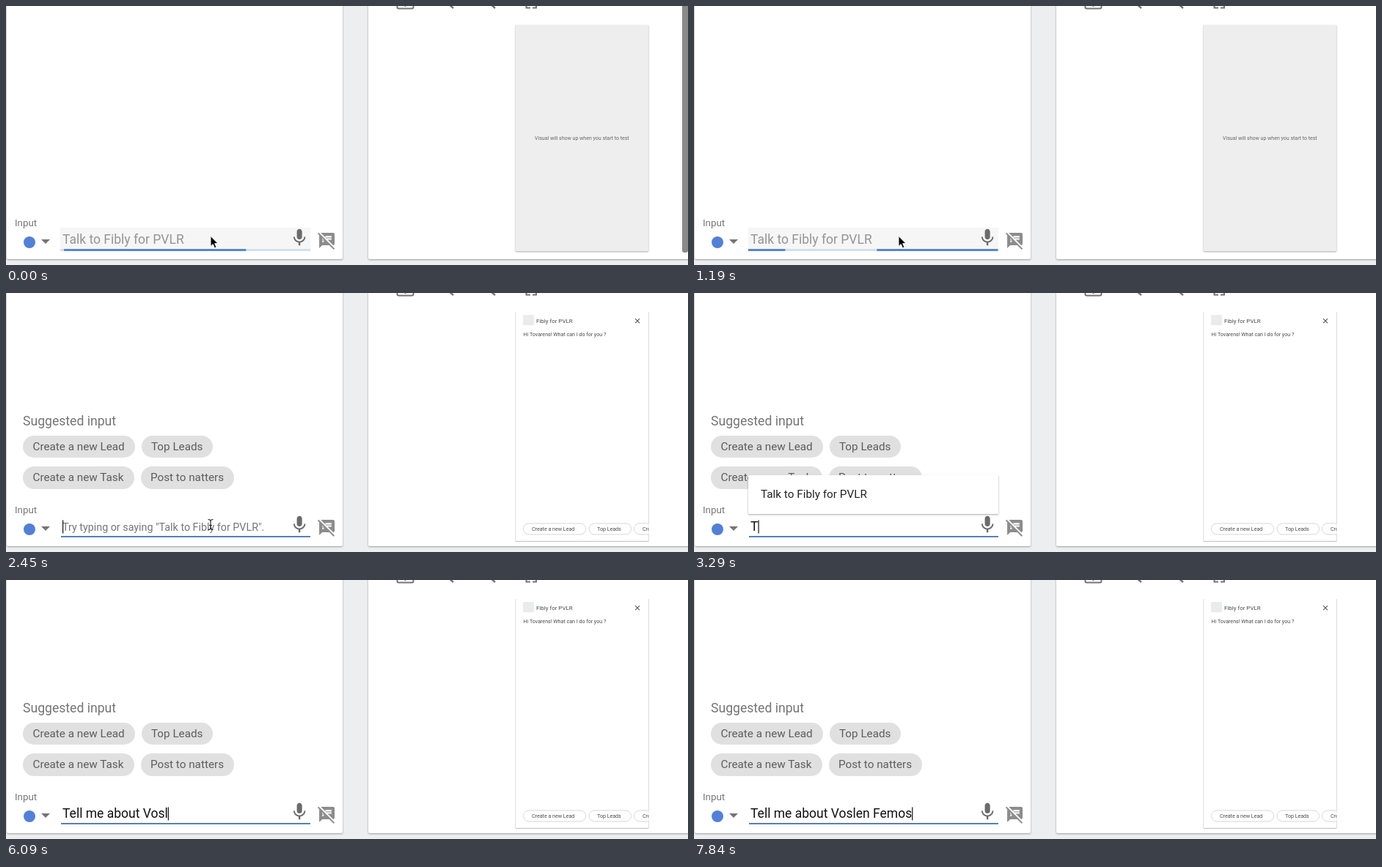
An HTML page for the animation above (8000 ms loop, 930 px wide and 354 px high).

```html
<!DOCTYPE html>
<html lang="en">
<head>
<meta charset="utf-8">
<title>Assistant test console</title>
<style>
  html, body { margin: 0; width: 100%; height: 100%; overflow: hidden; background: #eceef0; }
  svg { display: block; width: 930px; height: 354px; font-family: Roboto, sans-serif; }
  text { white-space: pre; }
  .card { fill: #fff; filter: drop-shadow(0 1px 1.2px rgba(0, 0, 0, .35)); }
  .chip rect { fill: #e0e0e0; }
  .chip text { font-size: 15.25px; fill: #5c5c5c; }
  .pill rect { fill: #fff; stroke: #d5d7da; }
  .small { font-size: 7.1px; fill: #4a4a4a; }
  .line { fill: none; stroke: #757575; stroke-width: 2; }
</style>
</head>
<body>
<svg viewBox="0 0 930 354">
  <defs>
    <clipPath id="phoneClip"><rect x="695" y="26" width="181.5" height="313"/></clipPath>
  </defs>
  <rect width="930" height="354" fill="#eceef0"/>
  <rect class="card" x="1" y="-10" width="458" height="356" rx="2"/>
  <rect class="card" x="494" y="-10" width="450" height="356" rx="2"/>

  <g class="line">
    <path d="M533.5-5V1.5q0 2 2 2h18q2 0 2-2V-5M544.5-4V1"/>
    <path d="M602-4l8 7M659-4l8 7" stroke-width="2.4"/>
    <path d="M709.5-4V2.5H715M718 2.5h5V-4"/>
  </g>

  <g id="idlePhone">
    <rect class="card" x="695" y="26" width="181" height="309" style="fill:#eee"/>
    <text class="small" x="721" y="183" style="font-size:7.03px;fill:#666">Visual will show up when you start to test</text>
  </g>
  <g id="activePhone">
    <path d="M694.8 26V339.3H876.5V26" fill="#fff" stroke="#dcdcdc"/>
    <path d="M695 339.5H876" stroke="#c4c4c4"/>
    <g clip-path="url(#phoneClip)">
      <rect x="705" y="30" width="15" height="14" fill="#e9ebed"/>
      <text class="small" x="723" y="40.5" style="font-size:7.95px">Fibly for PVLR</text>
      <path d="M858 35.2l6 6m0-6l-6 6" stroke="#555" stroke-width="1.1"/>
      <text class="small" x="705.5" y="59">Hi Tovarens! What can I do for you ?</text>
      <g id="pills"></g>
    </g>
  </g>

  <g id="suggestions">
    <text x="23" y="181" font-size="17.6" fill="#757575">Suggested input</text>
    <g id="chips"></g>
  </g>

  <text x="12" y="301" font-size="13.3" fill="#757575">Input</text>
  <circle cx="32" cy="323" r="8" fill="#5280d8"/>
  <path d="M48 319h12l-6 6z" fill="#757575"/>

  <g id="waiting">
    <rect x="74" y="303" width="341" height="32" fill="#f6f6f6"/>
    <text x="77" y="325" font-size="17.5" fill="#959595">Talk to Fibly for PVLR</text>
    <rect x="74" y="332" width="341" height="3" fill="#d3dfee"/>
    <g fill="#5688c4">
      <rect class="bar" y="332" height="3"/>
      <rect class="bar" y="332" height="3"/>
    </g>
  </g>
  <g id="ready">
    <rect x="75" y="332" width="340" height="2" fill="#5382b3"/>
    <text id="hint" x="77" y="325" font-size="14.3" fill="#757575">Try typing or saying "Talk to Fibly for PVLR".</text>
    <text id="typed" x="77" y="325" font-size="17.5" fill="#111"></text>
    <rect id="caret" y="310.5" width="1.2" height="18" fill="#111"/>
  </g>
  <g id="popup">
    <rect class="card" x="74" y="249" width="341" height="53"/>
    <text x="91" y="280" font-size="15.3" fill="#222">Talk to Fibly for PVLR</text>
  </g>

  <path fill="#6b6b6b" transform="translate(386 302.5) scale(1.18)" d="M12 14c1.66 0 3-1.34 3-3V5c0-1.66-1.34-3-3-3S9 3.34 9 5v6c0 1.66 1.34 3 3 3zm5.3-3c0 3-2.54 5.1-5.3 5.1S6.7 14 6.7 11H5c0 3.41 2.72 6.23 6 6.72V21h2v-3.28c3.28-.48 6-3.3 6-6.72h-1.7z"/>
  <path fill="#8c8c8c" transform="translate(425 308) scale(1.05)" d="M10.54 11L1.27 1.73 0 3l2.01 2.01L2 22l4-4h9l5.73 5.73L22 22.46 10.54 11zM8 14H6v-2h2v2zm-2-3V9l2 2H6zm14-9H4.08L10 7.92V6h8v2h-7.92l1 1H18v2h-4.92l6.99 6.99C21.14 17.95 22 17.08 22 16V4c0-1.1-.9-2-2-2z"/>

  <path id="arrow" d="M279 314.5v14l3.2-3 2.3 5.2 2.4-1-2.3-5.1h4.4z" fill="#000" stroke="#fff" stroke-width=".9"/>
  <path id="ibeam" d="M275.5 309.5q3.5 0 3.5 2.5v9q0 2.5-3.5 2.5M282.5 309.5q-3.5 0-3.5 2.5M279 321q0 2.5 3.5 2.5M277 317.5h4" fill="none" stroke="#222" stroke-width="1.2"/>
  <rect id="scrollbar" x="922" y="-6" width="8" height="343" rx="3" fill="#8a8a8a"/>
</svg>
<script>
const LOOP = 8000, STEP = 70;
const REPLY = 1330, TYPING = 3220;
const PHRASE = 'Tell me about Voslen Femos';

// [time, number of characters typed]
const KEYS = [
  [3220, 1], [3500, 2], [3640, 3], [3780, 4], [4060, 6],
  [4270, 7], [4480, 9], [4620, 10], [4760, 11], [4900, 12], [5040, 13], [5180, 14],
  [5390, 15], [5670, 16], [5810, 17], [6090, 18], [6300, 19], [6440, 20], [6580, 21],
  [7210, 22], [7350, 23], [7490, 24], [7630, 25], [7840, 26]
];
const CARET_OFF = [[0, 1470], [1890, 2450], [2940, 3220], [7070, 7210]];

// [phase, left edge, right edge], as fractions of the track
const BARS = [
  [[0, 0, 0], [.5, .25, 1], [.75, 1, 1], [1, 1, 1]],
  [[0, 0, 0], [.5, 0, 0], [.588, 0, .147], [.795, .015, .744], [1, 1, 1]]
];
const TRACK = { x: 74, width: 340.5, period: 1500, phase: .795 };

const $ = id => document.getElementById(id);
const show = (id, opacity) => $(id).setAttribute('opacity', Number(opacity));
const clamp = v => Math.min(1, Math.max(0, v));

function button(parent, kind, x, y, width, height, label, labelX, baseline) {
  $(parent).insertAdjacentHTML('beforeend',
    `<g class="${kind}"><rect x="${x}" y="${y}" width="${width}" height="${height}" rx="${height / 2}"/>
     <text class="${kind === 'pill' ? 'small' : ''}" x="${labelX}" y="${baseline}">${label}</text></g>`);
}
button('chips', 'chip', 23, 195, 153, 30, 'Create a new Lead', 36.5, 215);
button('chips', 'chip', 185, 195, 97, 30, 'Top Leads', 198, 215);
button('chips', 'chip', 23, 237, 152, 31, 'Create a new Task', 36.5, 257);
button('chips', 'chip', 184, 237, 127, 31, 'Post to natters', 197, 257);
button('pills', 'pill', 705.5, 315, 85, 15, 'Create a new Lead', 717, 325);
button('pills', 'pill', 795, 315, 57.5, 15, 'Top Leads', 806, 325);
button('pills', 'pill', 856.5, 315, 85, 15, 'Create a new Task', 868, 325);

function edges(frames, phase) {
  const i = Math.max(1, frames.findIndex(f => f[0] >= phase));
  const [p0, l0, r0] = frames[i - 1], [p1, l1, r1] = frames[i];
  const f = (phase - p0) / (p1 - p0);
  return [l0 + (l1 - l0) * f, r0 + (r1 - r0) * f];
}

function drawProgress(t) {
  const phase = (t / TRACK.period + TRACK.phase) % 1;
  document.querySelectorAll('.bar').forEach((bar, i) => {
    const [left, right] = edges(BARS[i], phase);
    bar.setAttribute('x', TRACK.x + left * TRACK.width);
    bar.setAttribute('width', (right - left) * TRACK.width);
  });
}

function drawInput(t) {
  const count = KEYS.reduce((n, [time, chars]) => t >= time ? chars : n, 0);
  const typed = $('typed');
  typed.textContent = PHRASE.slice(0, count);
  $('caret').setAttribute('x', 77 + (count ? typed.getComputedTextLength() : 0));
  show('caret', !CARET_OFF.some(([from, to]) => t >= from && t < to));
  show('hint', count === 0);
}

function draw(t) {
  const replied = t >= REPLY;
  for (const id of ['idlePhone', 'waiting', 'arrow']) show(id, !replied);
  for (const id of ['activePhone', 'suggestions', 'ready']) show(id, replied);
  show('ibeam', replied && t < TYPING);
  show('popup', t < TYPING || t >= 3500 ? 0 : t < 3290 ? .5 : 1);
  show('scrollbar', clamp((1050 - t) / 280));
  drawProgress(t);
  drawInput(t);
}

const start = performance.now();
function tick() {
  const t = (performance.now() - start) % LOOP;
  draw(Math.floor(t / STEP) * STEP);
  requestAnimationFrame(tick);
}
tick();
</script>
</body>
</html>
```
